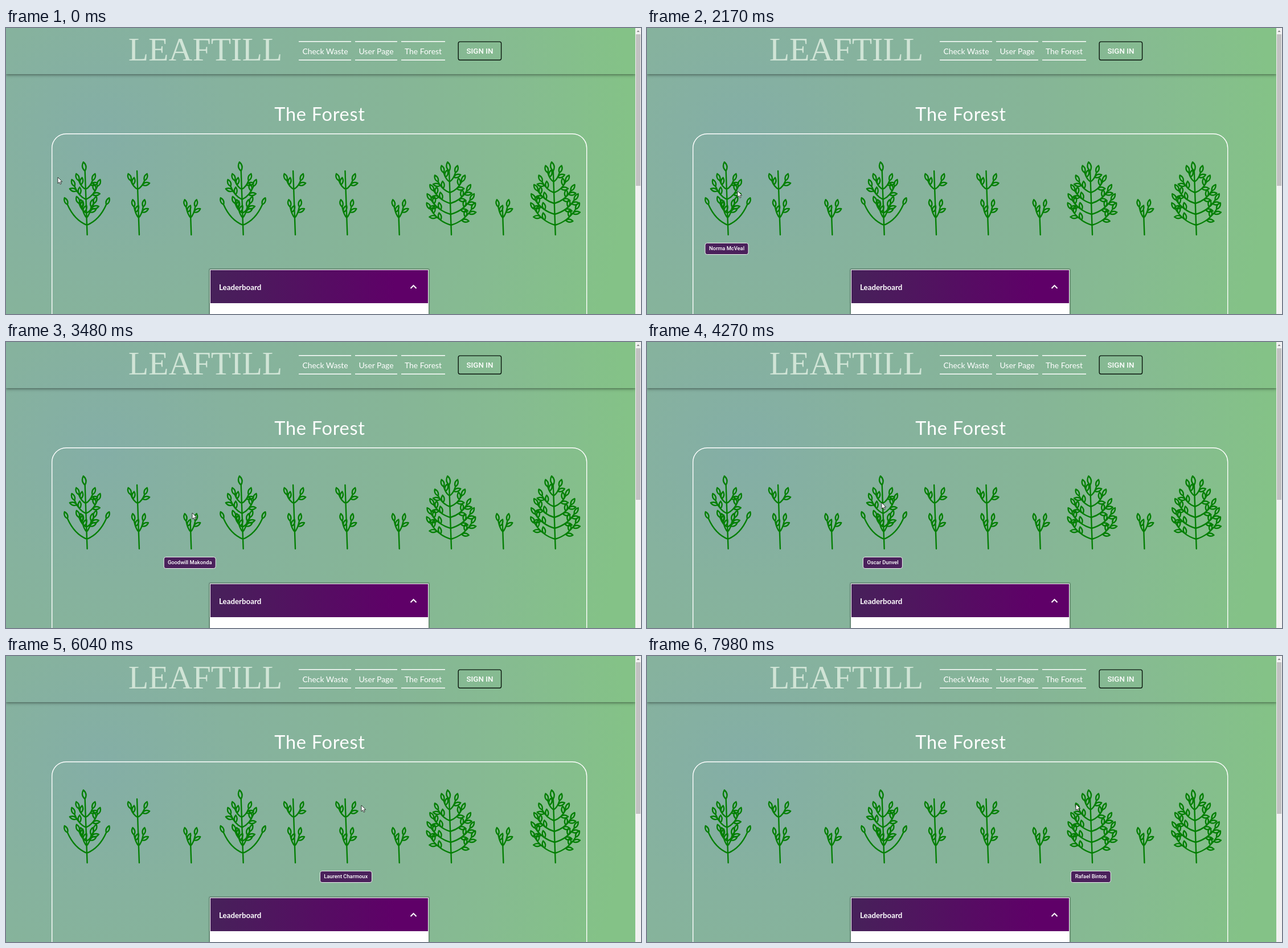
An HTML page for the animation above (8000 ms loop, 1115x502 px).

```html
<!DOCTYPE html>
<html lang="en">
<head>
<meta charset="utf-8">
<title>The Forest</title>
<style>
html, body { margin: 0; width: 100%; height: 100%; overflow: hidden; }
body { position: relative; background: radial-gradient(circle at 168px 192px, #84aea6, #86b29e 230px, #86b597 520px, #86bb91 720px, #84c287 930px); }
div, svg { position: absolute; box-sizing: border-box; }
svg { left: 0; top: 0; width: 1115px; height: 502px; }
#header { left: 0; top: 0; width: 1105px; height: 81px; box-shadow: 0 1px 4px #0006, 0 3px 6px #0002; clip-path: inset(0 0 -14px 0); }
#board { left: 358px; top: 424px; width: 384px; height: 100px; border: 1px solid #fff; background: #fff; box-shadow: 0 0 2px 1px #0007; }
#bar { left: 0; top: 0; width: 100%; height: 58px; background: linear-gradient(90deg, #47215a, #5f0068 85%); }
#scroll { right: 0; top: 0; width: 10px; height: 502px; background: #f1f1f1; }
#thumb { left: 1px; top: 11px; width: 8px; height: 266px; background: #c1c1c1; }
.tip { top: 377px; height: 20.5px; padding: 0 6.5px; border: 1px solid #eee; border-radius: 4px; background: #4a215b; color: #fff;
  font: 500 9.33px/18.5px Roboto, sans-serif; white-space: nowrap; }
text { fill: #fff; font-family: Lato, sans-serif; text-anchor: middle; }
#logo { font: 58px "Liberation Serif", serif; fill: #d0e4d6; }
#plants { fill: none; stroke: #047f04; stroke-width: 2.4; stroke-linecap: round; stroke-linejoin: round; }
</style>
</head>
<body>
<div id="header"></div>
<div id="board"><div id="bar"></div></div>
<svg>
  <text id="logo" x="350" y="57">LEAFTILL</text>
  <g font-size="13.9">
    <text x="560.5" y="45.5">Check Waste</text>
    <text x="650" y="45.5">User Page</text>
    <text x="732.5" y="45.5">The Forest</text>
  </g>
  <path d="M514 23.7H606M613 23.7H687M694 23.7H771M514 56.3H606M613 56.3H687M694 56.3H771" stroke="#fff" stroke-width="1.5"/>
  <rect x="794.2" y="24.1" width="75.4" height="32.2" rx="3" fill="none" stroke="#08140c" stroke-width="1.4"/>
  <text x="832" y="44.6" style="font: 500 13.33px Roboto, sans-serif">SIGN IN</text>
  <text x="551" y="162.5" font-size="32.5" letter-spacing=".75">The Forest</text>
  <rect x="80.7" y="185.7" width="939" height="400" rx="25" fill="none" stroke="#fff" stroke-width="1.4"/>
  <text x="374" y="459.7" font-size="13.3" font-weight="700" style="text-anchor: start">Leaderboard</text>
  <path d="M710.5 457L715.5 452L720.5 457" fill="none" stroke="#fff" stroke-width="2"/>
  <g id="plants"></g>
</svg>
<div id="scroll"><div id="thumb"></div></div>
<div id="tips"></div>
<svg>
  <path d="M1107.5 7L1110 4L1112.5 7Z" fill="#888"/>
  <path id="cursor" d="M0 0V10.8L2.5 8.5L4.2 12.2L6 11.4L4.4 7.8H7.7Z" fill="#fff" stroke="#111" stroke-width=".8"/>
</svg>
<script>
const LOOP = 8000, STEP = 77.3, SPACING = 91.35, GROUND = 363;
const $ = id => document.getElementById(id);
const clamp = v => Math.max(0, Math.min(1, v));
const mix = (a, b, u) => a + (b - a) * u;
const column = i => 140 + SPACING * i;

// A leaf is a narrow pointed oval growing from its base at the given angle.
function leaf(x, y, angle, size = 13) {
  const dx = size * Math.cos(angle), dy = size * Math.sin(angle);
  const side = k => `${x + dx / 2 - k * dy} ${y + dy / 2 + k * dx}`;
  return `M${x} ${y}Q${side(.4)} ${x + dx} ${y + dy}Q${side(-.4)} ${x} ${y}`;
}

const stemX = y => 2.6 - .035 * (GROUND - y);
const stem = top => `M${stemX(GROUND)} ${GROUND}L${stemX(top)} ${top}`;

// A curved twig with leaves on alternating sides and one at its end.
function twig(y, w, h, count) {
  const x = stemX(y), cx = x + .65 * w, cy = y - .25 * h, ex = x + w, ey = y - h;
  let d = `M${x} ${y}Q${cx} ${cy} ${ex} ${ey}`;
  for (let i = 1; i <= count; i++) {
    const u = .25 + .75 * i / count;
    const ax = mix(x, cx, u), ay = mix(y, cy, u), bx = mix(cx, ex, u), by = mix(cy, ey, u);
    const turn = i == count ? 0 : i % 2 ? .75 : -.75;
    d += leaf(mix(ax, bx, u), mix(ay, by, u), Math.atan2(by - ay, bx - ax) + turn);
  }
  return d;
}
const pair = (y, w, h, count = 1 + Math.round(w / 11)) => twig(y, -w, h, count) + twig(y, w, h, count);

const crown = leaf(stemX(251), 251, -1.75, 16);
const sprout = stem(316) + pair(333, 8, 19);
const sapling = sprout + stem(251) + pair(283, 12, 15);
const young = sapling + crown + pair(346, 34, 36, 1) + pair(325, 13, 17) + pair(301, 20, 23);
let full = stem(251) + crown;
for (let k = 0; k < 5; k++) full += pair(346 - 19 * k, 36 * Math.cos(.32 * k), 28 - 3 * k);

const kinds = { s: sprout, m: sapling, y: young, f: full };
$("plants").innerHTML = [..."ymsymmsfsf"]
  .map((kind, i) => `<path transform="translate(${column(i)})" d="${kinds[kind]}"/>`).join("");

// Cursor key points: time, x, y
const path = [[0, 91, 262], [1330, 88, 263], [2010, 139, 284], [3480, 327.5, 300], [4660, 456, 272],
  [5040, 505, 271], [5780, 587, 256], [6040, 626, 262], [6590, 681, 271], [6980, 691, 270],
  [7750, 744, 263], [LOOP, 755, 260]];
function position(t) {
  const i = path.findIndex(p => p[0] > t), [t0, x0, y0] = path[i - 1], [t1, x1, y1] = path[i];
  const u = (t - t0) / (t1 - t0);
  return [Math.round(mix(x0, x1, u)), Math.round(mix(y0, y1, u))];
}

// The moment the cursor moves into a column, after its first idle phase
function enterTime(i) {
  let t = path[1][0];
  while (t < LOOP && position(t)[0] < column(i - .5)) t += 10;
  return t;
}

const tips = ["Norma McVeal", "Hanna Kolvas", "Goodwill Makonda", "Oscar Dunvel",
  "Anatol Brovkin", "Laurent Charmoux", "Maurice Dargoulin", "Rafael Bintos"].map((name, i) => {
  const box = document.createElement("div");
  box.className = "tip";
  box.textContent = name;
  box.style.left = column(i) + "px";
  $("tips").append(box);
  return { box, enter: enterTime(i), leave: enterTime(i + 1) };
});

function draw(now) {
  const t = Math.floor(now % LOOP / STEP) * STEP;
  $("cursor").setAttribute("transform", `translate(${position(t)})`);
  for (const { box, enter, leave } of tips) {
    const show = clamp((t - enter) / 150);
    box.style.opacity = show * (1 - clamp((t - leave) / 200));
    box.style.transform = `translateX(-50%) scale(${mix(.75, 1, show)})`;
  }
  requestAnimationFrame(draw);
}
draw(0);
</script>
</body>
</html>
```
